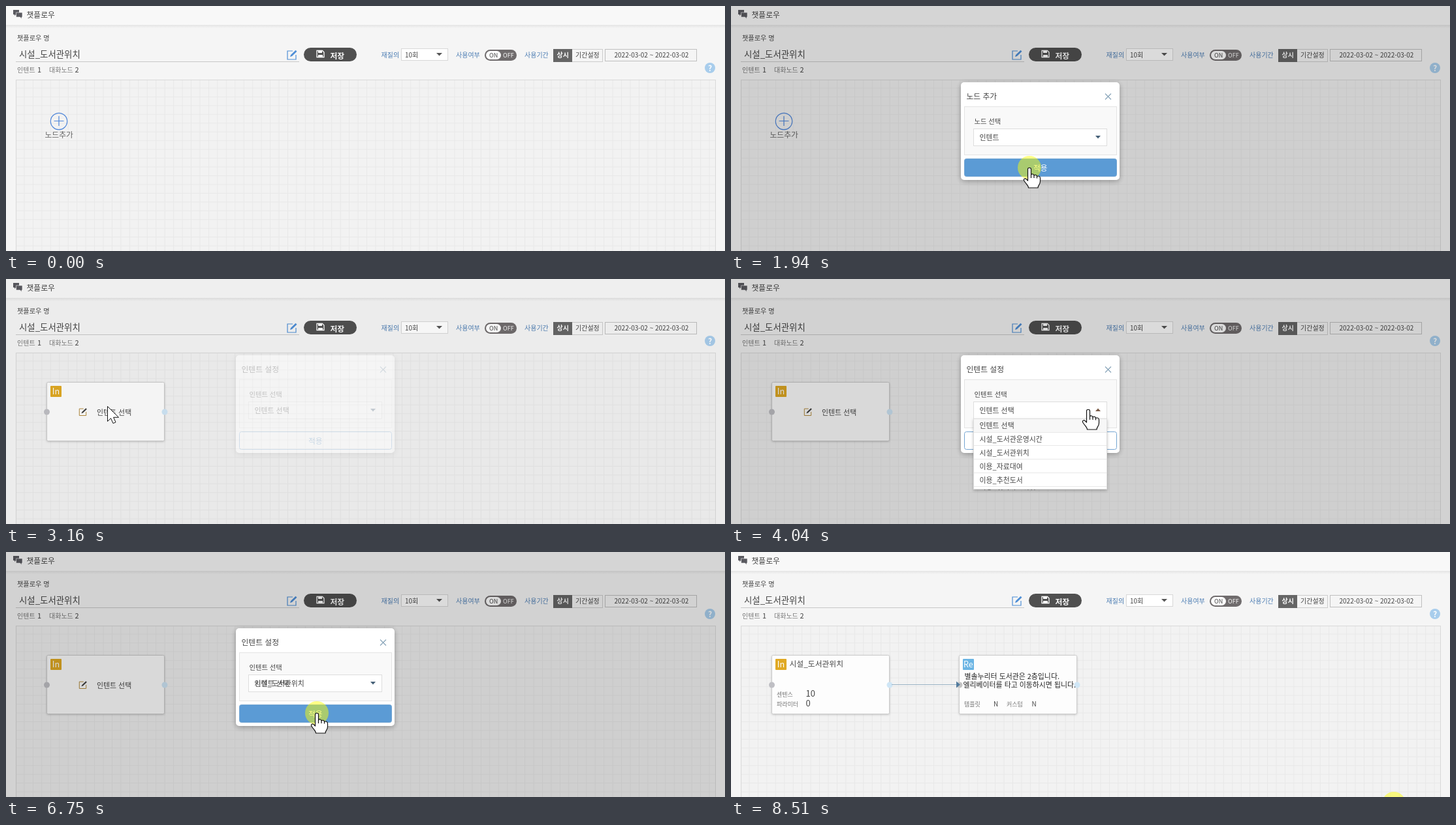
Write an HTML page that moves like this. It is 1101 px wide and 376 px high and loops after 8630 ms.

```html
<!DOCTYPE html>
<html lang="ko">
<head>
<meta charset="utf-8">
<title>챗플로우</title>
<style>
html, body { margin: 0; width: 100%; height: 100%; overflow: hidden; background: #f5f5f5; }
svg { display: block; width: 100vw; height: 100vh; }
text { font: 10px "Noto Sans CJK KR", "Noto Sans CJK", "Noto Sans", sans-serif; fill: #444; white-space: pre; }
.t9 { font-size: 9px; }
.t11 { font-size: 10.9px; }
.t12 { font-size: 11.8px; }
.t13 { font-size: 13.4px; }
.mid { font-weight: 500; }
.bold { font-weight: 700; }
.blue { fill: #4c7db3; font-weight: 500; }
.gray { fill: #777; }
.white { fill: #fff; }
.card { fill: #fdfdfd; stroke: #ccc; filter: drop-shadow(0 1px 1.5px rgba(0,0,0,.18)); }
.line { fill: none; stroke-width: 1.2; }

/* One shared 8.63 s timeline */
.step, .fade, #cursor, .slide { animation: 8.63s linear infinite; }
.step { animation-timing-function: step-end; }

#plus { animation-name: plus; }
@keyframes plus { 0% { opacity: 1 } 24.45%, 100% { opacity: 0 } }
#card1 { animation-name: card1; }
@keyframes card1 { 0% { opacity: 0 } 24.45%, 100% { opacity: 1 } }
#empty { animation-name: empty; }
@keyframes empty { 0% { opacity: 1 } 79.37%, 100% { opacity: 0 } }
#filled { animation-name: filled; }
@keyframes filled { 0% { opacity: 0 } 79.37%, 100% { opacity: 1 } }
#card2 { animation-name: card2; }
@keyframes card2 { 0% { opacity: 0 } 85.2%, 100% { opacity: 1 } }

#modal { animation-name: modal; }
@keyframes modal {
  0%, 8.4%, 25.3%, 36.04%, 79.6%, 100% { opacity: 0 }
  10.5%, 24.1%, 38.24%, 79.26% { opacity: 1 }
}
#add { animation-name: add; }
@keyframes add { 0% { opacity: 1 } 30%, 100% { opacity: 0 } }
#set { animation-name: set; }
@keyframes set { 0% { opacity: 0 } 30%, 100% { opacity: 1 } }
#unset { animation-name: unset; }
@keyframes unset { 0% { opacity: 1 } 71.5%, 100% { opacity: 0 } }
#chosen { animation-name: chosen; }
@keyframes chosen { 0% { opacity: 0 } 71.5%, 100% { opacity: 1 } }
#button { animation-name: button; }
@keyframes button {
  0%, 24.45%, 79.37%, 100% { fill: #fff }
  20.6%, 76.5% { fill: #5b9bd5 }
}
#apply { animation-name: apply; }
@keyframes apply {
  0%, 24.45%, 79.37%, 100% { fill: #5f97c8 }
  20.6%, 76.5% { fill: #fff }
}

#down { animation-name: down; }
@keyframes down { 0%, 71.5%, 100% { opacity: 1 } 45.4% { opacity: 0 } }
#up, #menu { animation-name: up; }
@keyframes up { 0%, 73%, 100% { opacity: 0 } 45.4% { opacity: 1 } }
.slide { animation-name: slide; }
@keyframes slide {
  0%, 45.54%, 73%, 100% { height: 0 }
  47.74%, 71.5% { height: 185px }
}
#hover { animation-name: hover; }
@keyframes hover {
  0% { transform: translateY(-62px) }
  52.5% { transform: translateY(-41px) }
  53.6%, 65% { transform: translateY(-21px) }
  55.7%, 62% { transform: none }
  56.5%, 61% { transform: translateY(21px) }
  57.6% { transform: translateY(41px) }
  100% { transform: translateY(-21px) }
}

#loading { animation-name: loading; }
@keyframes loading { 0%, 79.37%, 85.9%, 100% { opacity: 0 } 80.9%, 84.4% { opacity: 1 } }
.dot { fill: #f0d96a; transform-box: fill-box; transform-origin: center; animation: pulse .863s linear infinite; }
@keyframes pulse { 0%, 100% { transform: scale(0) } 50% { transform: scale(1) } }

#cursor { animation-name: move; animation-timing-function: ease-in-out; }
@keyframes move {
  0%, 2.2%, 98%, 100% { transform: translate(1015px, 386px) }
  7.5%, 12.4% { transform: translate(81px, 178px) }
  16.45%, 19.35% { transform: translate(470px, 196px) }
  21.6%, 27.35% { transform: translate(457px, 248px) }
  33%, 39.4% { transform: translate(155px, 195px) }
  43.68%, 49.2% { transform: translate(547px, 200px) }
  54.92% { transform: translate(508px, 268px) }
  58.05%, 60.14% { transform: translate(479px, 323px) }
  63.27%, 64.08% { transform: translate(461px, 296px) }
  65.82% { transform: translate(458px, 274px) }
  67.9%, 73.58% { transform: translate(457px, 273px) }
  77.06%, 82.1% { transform: translate(476px, 247px) }
  85.98%, 89.69% { transform: translate(471px, 251px) }
  95.9% { transform: translate(985px, 388px) }
}
#hand { animation-name: hand; }
@keyframes hand {
  0%, 9.04%, 24.45%, 36.04%, 79.37%, 100% { opacity: 0 }
  6.95%, 15.64%, 30.71%, 42.3% { opacity: 1 }
}
#arrow { animation-name: arrow; }
@keyframes arrow {
  0%, 9.04%, 24.45%, 36.04%, 79.37%, 100% { opacity: 1 }
  6.95%, 15.64%, 30.71%, 42.3% { opacity: 0 }
}
#press { animation-name: press; }
@keyframes press {
  0%, 8.8%, 24.1%, 36.04%, 46.1%, 72.31%, 79.26% { opacity: 0 }
  7.9%, 22.48%, 35.23%, 45.31%, 71.26%, 78.22%, 98.61%, 100% { opacity: 1 }
}
</style>
</head>
<body>
<svg viewBox="0 0 1101 376" preserveAspectRatio="none">
  <defs>
    <pattern id="grid" x="15" y="113" width="13.45" height="13.45" patternUnits="userSpaceOnUse">
      <path d="M13 0V13.45M0 13H13.45" stroke="#e8e8e8" fill="none"/>
    </pattern>
    <linearGradient id="edge" x2="0" y2="1">
      <stop stop-color="#e4e4e4"/><stop offset="1" stop-color="#f5f5f5"/>
    </linearGradient>
    <clipPath id="reveal"><rect class="slide" x="371" y="215" width="205" height="0"/></clipPath>
    <g id="pen" class="line">
      <path d="M9 2H1V15H14V8"/>
      <path d="M5 11L6 8L13.5 .8L15.5 2.8L8 10Z" fill="currentColor" stroke="none"/>
    </g>
  </defs>

  <rect width="1101" height="376" fill="#f5f5f5"/>
  <rect width="1101" height="29" fill="#f8f8f8"/>
  <rect y="29" width="1101" height="5" fill="url(#edge)"/>

  <!-- Header and settings -->
  <path d="M11 6H20V13H15L13 15V13H11Z" fill="#5a5a60"/>
  <path d="M15.5 10H25V17H24V19.500L21.500 17H15.500Z" fill="#5a5a60" stroke="#f8f8f8" stroke-width=".6"/>
  <text class="t12" x="31.500" y="18">챗플로우</text>
  <text x="17" y="53" style="font-size:10.2px">챗플로우 명</text>
  <text class="t13" x="20" y="79" fill="#333">시설_도서관위치</text>
  <path d="M15 85.500H449" stroke="#c8c8c8"/>
  <use href="#pen" x="430" y="67" stroke="#4f8fd6" color="#4f8fd6"/>
  <rect x="456" y="64" width="81" height="21" rx="10.500" fill="#505050"/>
  <path d="M476 68.500H484.500L487 71V78.500H476Z" fill="none" stroke="#fff" stroke-width="1.300"/>
  <path d="M478 68.500H484V72H478ZM478 75H485V78H478Z" fill="#fff"/>
  <text class="t12 bold white" x="496.500" y="80.500">저장</text>
  <text class="gray" x="17" y="102">인텐트</text>
  <text x="48" y="102" style="font-size:11px">1</text>
  <text class="gray" x="66" y="102">대화노드</text>
  <text x="105.500" y="102" style="font-size:11px">2</text>

  <text class="blue" x="574.500" y="78.500">재질의</text>
  <rect x="605.500" y="65.500" width="71" height="18" fill="#fff" stroke="#d8d8d8"/>
  <text x="611" y="78.500">10회</text>
  <path d="M659 72H668L663.500 76.500Z" fill="#555"/>
  <text class="blue" x="689" y="78.500">사용여부</text>
  <rect x="733" y="67" width="49" height="17" rx="8.500" fill="#706c6d"/>
  <rect x="735" y="69" width="23" height="13" rx="6.500" fill="#fff"/>
  <text class="t9 mid" x="740" y="79">ON</text>
  <text class="t9 white" x="761" y="79">OFF</text>
  <text class="blue" x="794" y="78.500">사용기간</text>
  <rect x="838.500" y="66.500" width="75" height="19" fill="#f5f5f5" stroke="#ccc"/>
  <rect x="838" y="66" width="29" height="20" fill="#666"/>
  <text class="bold white" x="843.500" y="79">상시</text>
  <text x="872" y="79">기간설정</text>
  <rect x="917.500" y="66.500" width="140" height="18" fill="#f5f5f5" stroke="#bfbfbf"/>
  <text x="931.500" y="79">2022-03-02 ~ 2022-03-02</text>
  <circle cx="1078" cy="95" r="8" fill="#a8cdec"/>
  <text class="bold white" x="1075" y="99.500" style="font-size:12px">?</text>

  <!-- Canvas -->
  <rect x="15" y="113" width="1072" height="264" fill="#f2f2f2"/>
  <rect x="15.500" y="113.500" width="1071" height="270" fill="url(#grid)" stroke="#d9d9d9"/>

  <g id="plus" class="step">
    <circle class="line" cx="81" cy="177" r="12.700" stroke="#4f86d9"/>
    <path class="line" d="M73.500 176.500H88.500M81 169V184" stroke="#4f86d9"/>
    <text class="t12" x="59.500" y="202" style="fill:#666">노드추가</text>
  </g>

  <g id="card1" class="step">
    <rect class="card" x="62.500" y="158.500" width="180" height="90" rx="2"/>
    <circle cx="62.500" cy="204" r="4.500" fill="#bfbfc4"/>
    <circle cx="243" cy="204" r="4.500" fill="#cfe6f6"/>
    <rect x="68" y="164" width="17" height="17" rx="1" fill="#e0a924"/>
    <text class="mid white" x="70.800" y="177" style="font-size:12.500px">In</text>
    <g id="empty" class="step">
      <g transform="translate(111.500 197.500) scale(.8)"><use href="#pen" stroke="#b08636" color="#444"/></g>
      <text class="t11 mid" x="139" y="209">인텐트 선택</text>
    </g>
    <g id="filled" class="step">
      <text class="t12" x="89.500" y="176">시설_도서관위치</text>
      <text class="t9 gray mid" x="70" y="222">센텐스</text>
      <text x="114.500" y="222" style="font-size:13px">10</text>
      <text class="t9 gray mid" x="70" y="236.500">파라미터</text>
      <text x="114.500" y="237" style="font-size:13px">0</text>
    </g>
  </g>

  <g id="card2" class="step">
    <path d="M246 203.500H346" stroke="#9bb3c5" stroke-width="1.200"/>
    <rect class="card" x="349.500" y="158.500" width="180" height="90" rx="2"/>
    <circle cx="350" cy="204" r="4.500" fill="#c4c4c4"/>
    <circle cx="530" cy="204" r="4.500" fill="#cfe6f6"/>
    <path d="M345 198.500L351 203.500L345 208.500Z" fill="#527b9d"/>
    <rect x="355" y="164" width="17" height="17" rx="1" fill="#6bb5e4"/>
    <text class="mid white" x="356" y="177" style="font-size:12.500px">Re</text>
    <text class="t11" x="357.500" y="195" style="fill:#222">별솔누리터 도서관은 2층입니다.</text>
    <text class="t11" x="355.500" y="208" style="fill:#222">엘리베이터를 타고 이동하시면 됩니다.</text>
    <text class="t9 gray mid" x="357" y="237">템플릿</text>
    <text class="mid" x="402" y="237">N</text>
    <text class="t9 gray mid" x="422" y="237">커스텀</text>
    <text class="mid" x="460.500" y="237">N</text>
  </g>

  <!-- Dialog -->
  <g id="modal" class="fade">
    <rect width="1101" height="376" fill="#000" opacity=".14"/>
    <rect x="352" y="117" width="243" height="150" rx="5" fill="#fff" style="filter:drop-shadow(0 2px 4px rgba(0,0,0,.3))"/>
    <path d="M573 134.500L582 143.500M582 134.500L573 143.500" stroke="#86a3b8" stroke-width="1.100"/>
    <rect x="357.500" y="154.500" width="233" height="74" fill="#f9f9f9" stroke="#e4e4e4"/>
    <rect x="371.500" y="188.500" width="204" height="26" fill="#fff" stroke="#ddd"/>
    <rect id="button" class="step" x="357.500" y="234.500" width="233" height="27" rx="3" fill="#fff" stroke="#74a5d2"/>
    <text id="apply" class="t12 step" x="463" y="252.500">적용</text>
    <path id="down" class="step" d="M558 199H566L562 203.500Z" fill="#456077"/>
    <path id="up" class="step" d="M558 203H566L562 198.500Z" fill="#7a5a46"/>
    <g id="add" class="step">
      <text class="t12" x="360.500" y="143">노드 추가</text>
      <text x="372.500" y="181" style="font-size:10.300px">노드 선택</text>
      <text class="t11 mid" x="380.500" y="206">인텐트</text>
    </g>
    <g id="set" class="step">
      <text class="t12" x="360.500" y="143">인텐트 설정</text>
      <text x="372.500" y="181" style="font-size:10.300px">인텐트 선택</text>
      <text id="unset" class="t11 mid step" x="380.500" y="206">인텐트 선택</text>
      <text id="chosen" class="t11 mid step" x="380.500" y="206">시설_도서관위치</text>
    </g>
    <g id="menu" class="step">
      <rect class="slide" x="371.500" y="214.500" width="204" height="0" fill="#fff" stroke="#ddd" style="filter:drop-shadow(0 2px 2px rgba(0,0,0,.25))"/>
      <g clip-path="url(#reveal)">
        <rect id="hover" class="step" x="372" y="277" width="203" height="20" fill="#f7f7f7"/>
        <path d="M372 235.500H575M372 255.500H575M372 276.500H575M372 297.500H575M372 318.500H575" stroke="#e8e8e8"/>
        <text class="t11" x="380.500" y="229">인텐트 선택</text>
        <text class="t11" x="380.500" y="250">시설_도서관운영시간</text>
        <text class="t11" x="380.500" y="271">시설_도서관위치</text>
        <text class="t11" x="380.500" y="292">이용_자료대여</text>
        <text class="t11" x="380.500" y="312.500">이용_추천도서</text>
        <text class="t11" x="380.500" y="333">이용_희망자료신청</text>
      </g>
    </g>
  </g>

  <g id="loading" class="fade">
    <rect width="1101" height="376" fill="#000" opacity=".54"/>
    <circle class="dot" cx="425" cy="159" r="4" style="animation-delay:-315ms"/>
    <circle class="dot" cx="434" cy="159" r="4" style="animation-delay:-195ms"/>
    <circle class="dot" cx="443" cy="159" r="4" style="animation-delay:-847ms"/>
    <text class="t13 bold white" x="465.500" y="163">진행중입니다.</text>
  </g>

  <g id="cursor">
    <circle id="press" class="step" r="18" fill="#ff0" fill-opacity=".48"/>
    <path id="arrow" class="step" d="M.5 .5V23.500L5.500 18.700L9 26.500L13 24.800L9.600 17.300H17.500Z" fill="#fff" stroke="#111"/>
    <g id="hand" class="step" fill="#fff" stroke="#111" stroke-width="1.200" stroke-linejoin="round">
      <path d="M-2.500 2.500C-2.500-.500 2.500-.500 2.500 2.500V11C3 9.500 7 9.500 7 12C8 10.800 11.500 11 11.500 13.500C13 12.500 16.500 13 16.500 16V21C16.500 26 13 27 13 31H-1.500C-1.500 28-4 26.500-8 20.500C-10 17.500-6.500 15.500-4.500 18L-2.500 20Z"/>
      <path d="M2.500 11V16M7 12V16M11.500 13.500V16.500" fill="none"/>
    </g>
  </g>
</svg>
</body>
</html>
```
